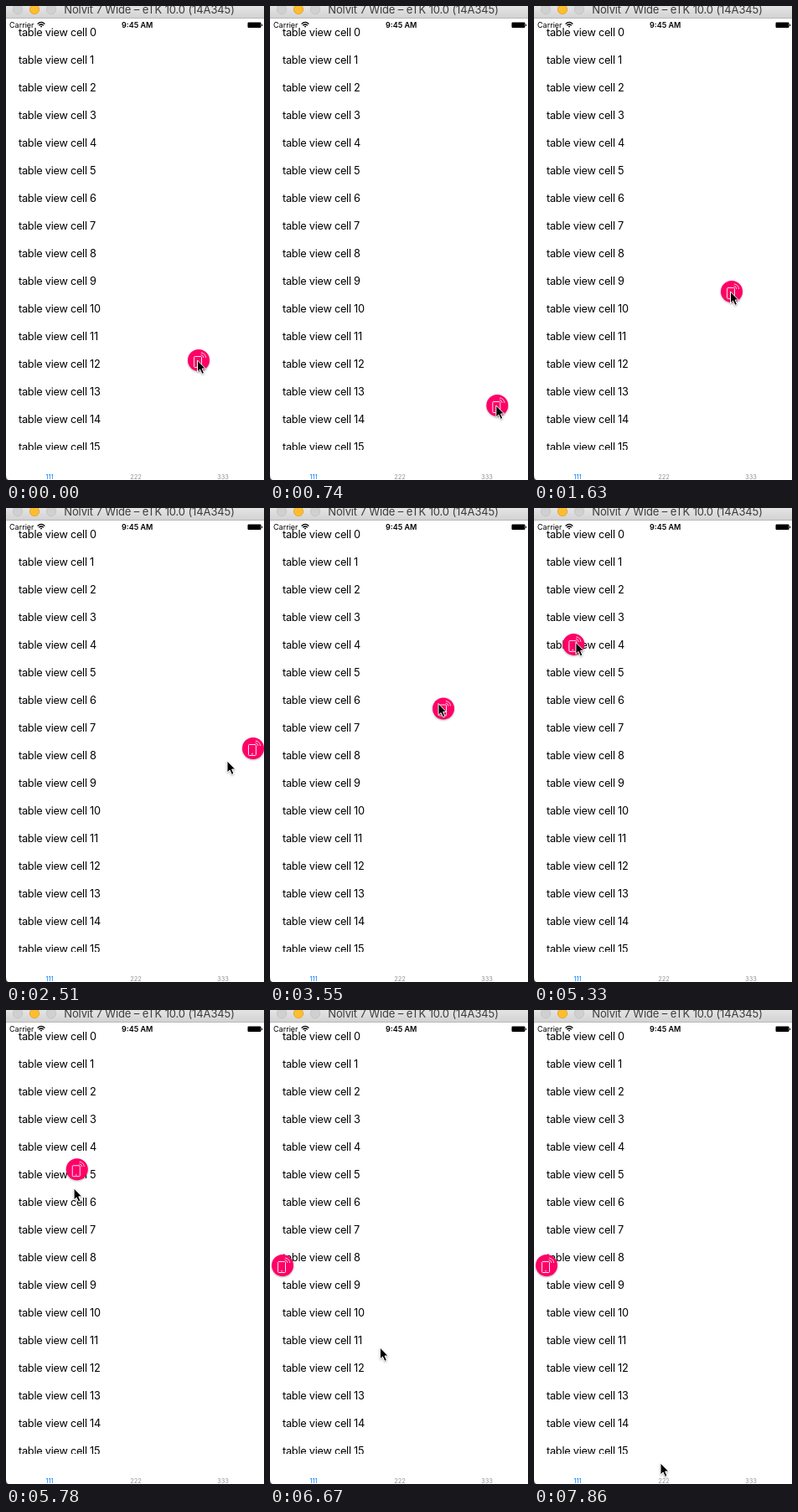
Write an HTML page that moves like this. It is 308 by 566 pixels and loops after 8000 ms.

```html
<!DOCTYPE html>
<html lang="en">
<head>
<meta charset="utf-8">
<title>Floating button</title>
<style>
  html, body { margin: 0; width: 100%; height: 100%; overflow: hidden; background: #fff; }
  svg { display: block; width: 100vw; height: 100vh; font-family: Inter, Roboto, sans-serif; }
  #rows { font-size: 12.75px; letter-spacing: -.26px; }
  .title { font-size: 13px; letter-spacing: -.12px; fill: #3c3c3c; }
  .status { font-size: 9px; }
  .tabs { font-size: 7.5px; fill: #929292; }
  .mid { text-anchor: middle; }
  #button { filter: drop-shadow(0 1px 1px rgba(0, 0, 0, .3)); }
  #cursor { filter: drop-shadow(0 1px 1px rgba(0, 0, 0, .3)); }
</style>
</head>
<body>
<svg viewBox="0 0 308 566">
  <defs>
    <linearGradient id="bar" x2="0" y2="1">
      <stop stop-color="#e4e4e4"/><stop offset="1" stop-color="#d3d3d3"/>
    </linearGradient>
    <clipPath id="list"><path d="M0 15H308V530H0Z"/></clipPath>
  </defs>
  <rect width="308" height="566" fill="#fff"/>
  <g clip-path="url(#list)"><g id="rows"></g></g>

  <!-- window bar -->
  <rect width="308" height="14" fill="url(#bar)"/>
  <rect y="14" width="308" height="1" fill="#b8b8b8"/>
  <g stroke-width=".8" fill="#d0d0d0" stroke="#bfbfbf">
    <circle cx="14" cy="4" r="5.7"/>
    <circle cx="34" cy="4" r="5.7" fill="#fdbd2f" stroke="#e0a028"/>
    <circle cx="54" cy="4" r="5.7"/>
  </g>
  <text class="title mid" x="171" y="9">Nolvit 7 Wide – eTK 10.0 (14A345)</text>

  <!-- status bar -->
  <g class="status">
    <text x="4" y="26">Carrier</text>
    <text class="mid" x="156.7" y="26" font-weight="600">9:45 AM</text>
    <g fill="none" stroke="#000" stroke-width="1.3">
      <path d="M37.6 21.4Q42 17.4 46.4 21.4M39.2 23.2Q42 20.8 44.8 23.2"/>
      <path d="M40.6 24.1Q42 23.2 43.4 24.1L42 25.8Z" fill="#000" stroke="none"/>
    </g>
    <rect x="288.5" y="19.5" width="16" height="6.5" rx="1.2"/>
    <rect x="305.2" y="21.5" width="1" height="2.6" rx=".5"/>
  </g>

  <!-- tab bar -->
  <g class="tabs mid">
    <text x="52" y="564.7" fill="#007aff">111</text>
    <text x="155" y="564.7">222</text>
    <text x="259" y="564.7">333</text>
  </g>
  <path d="M0 560Q0 566 4 566H0Z" fill="#444"/>

  <g id="button">
    <circle r="13" fill="#ff0066"/>
    <g fill="none" stroke="#fff" stroke-width=".9">
      <rect x="-5.5" y="-4.5" width="9" height="13" rx="1"/>
      <path d="M-2 6.7H0M2.6-6.6Q5.6-6.2 6-3M2.8-9Q8-8.4 8.6-3" stroke-width=".8"/>
    </g>
  </g>
  <path id="cursor" d="M0 0V14L3.1 11 5.5 16.4 8 15.3 5.7 10H9.8Z" stroke="#fff" stroke-width="1"/>
</svg>
<script>
  const LOOP = 8000, STEPS = 54;
  const $ = id => document.getElementById(id);

  // A move: start step, end step, shift x, y and an optional bend x, y
  const drags = [
    [1, 4, 62, 81],
    [4, 7, -62, -81],
    [9, 13, 38, -136, -7, -96],
    [21, 27, -176, -95]
  ];
  const arc = [45, 112, 112, -116];

  const button = {
    x: 230, y: 423,
    moves: [
      ...drags, [35, 41, ...arc],
      // sliding to the nearest edge after release
      [13, 16, 27, 0], [27, 29, -104, 0], [42, 43, -45, 1]
    ]
  };
  const cursor = {
    x: 228.5, y: 423,
    moves: [
      ...drags, [35, 40.3, ...arc],
      // moving freely between drags
      [14, 17, -2.5, 15], [17, 19, 25, -21], [27, 29, 0, 19], [29, 33, -99, -13, -50, -44],
      [42, 46, 90, 112, 58, 96], [46, 47, 11, 184], [49, 53, -9, -59, -2, -130]
    ]
  };

  function place(id, { x, y, moves }, step) {
    for (const [from, to, dx, dy, bx = dx / 2, by = dy / 2] of moves) {
      const u = Math.min(1, Math.max(0, (step - from) / (to - from)));
      const bend = 2 * u * (1 - u);
      x += bend * bx + u * u * dx;
      y += bend * by + u * u * dy;
    }
    $(id).setAttribute("transform", `translate(${x} ${y})`);
  }

  $("rows").innerHTML = Array.from({ length: 16 }, (_, i) =>
    `<text x="15" y="${36.3 + 33 * i}">table view cell ${i}</text>`).join("");

  const start = performance.now();
  function draw() {
    const t = (performance.now() - start) % LOOP;
    const step = Math.min(STEPS - 1, Math.floor((t + 10) / LOOP * STEPS));
    place("button", button, step);
    place("cursor", cursor, step);
    requestAnimationFrame(draw);
  }
  draw();
</script>
</body>
</html>
```
